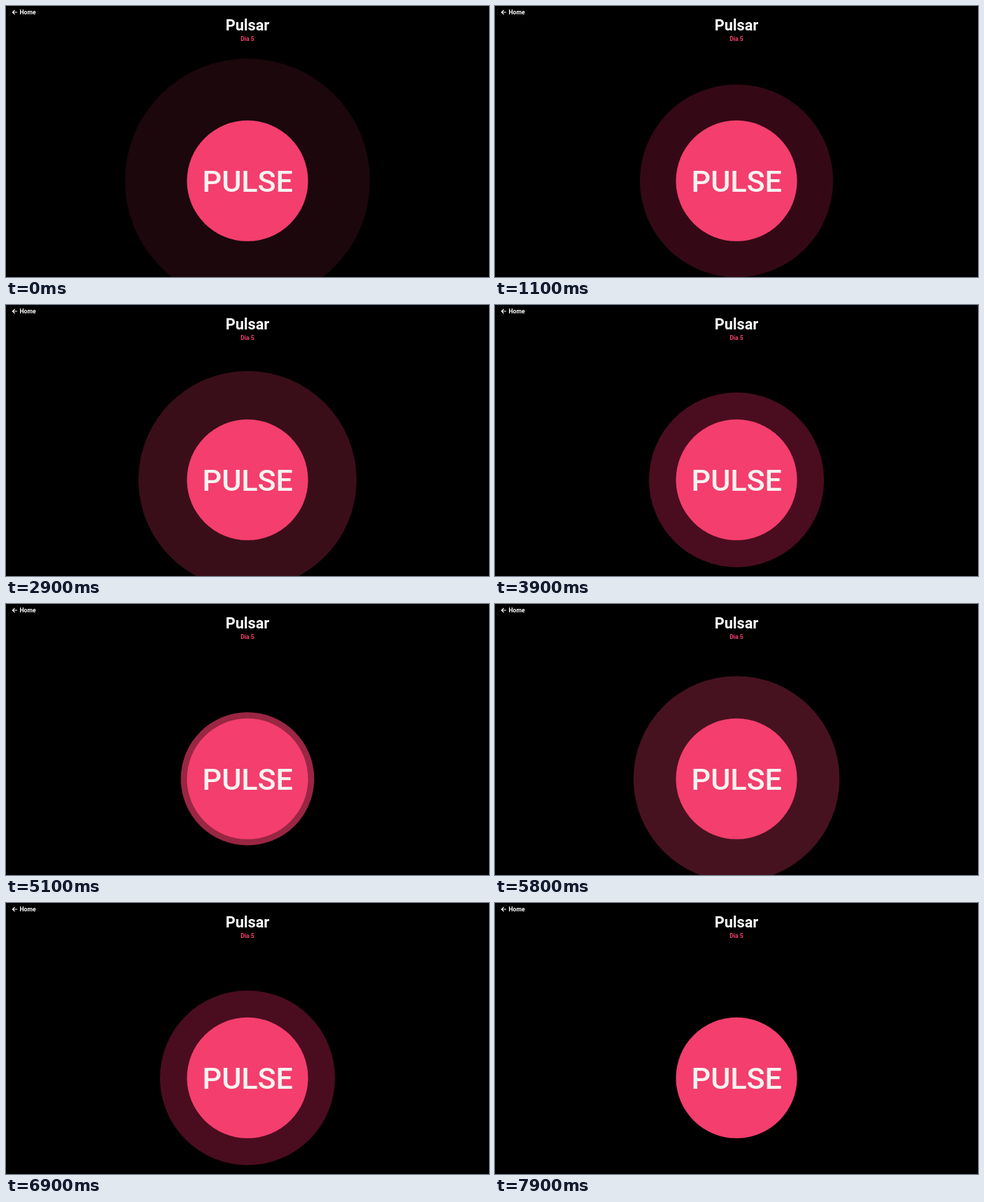
Animation of 690 by 388 pixels, one loop 8 s. Source, as an HTML page:

```html
<!DOCTYPE html>
<html lang="pt">
<head>
<meta charset="utf-8">
<title>Pulsar</title>
<style>
  html, body { margin: 0; width: 100%; height: 100%; overflow: hidden; background: #000; }
  svg { display: block; width: 100%; height: 100%; }
  text { font-family: Roboto, Arial, sans-serif; font-weight: 700; fill: #fff; }
  .mid { text-anchor: middle; }
</style>
</head>
<body>
<svg viewBox="0 0 690 388">
  <path d="M16 9H9.6M12.6 5.8L9.4 9L12.6 12.2" fill="none" stroke="#fff" stroke-width="1.2"/>
  <text x="19.5" y="12.2" font-size="8.63">Home</text>
  <text class="mid" x="345" y="35" font-size="21.6">Pulsar</text>
  <text class="mid" x="345" y="50" font-size="8.63" style="fill:#f43e6e">Dia 5</text>
  <circle id="ring" cx="345" cy="250.3"/>
  <circle cx="345" cy="250.3" r="86.5" fill="#f43e6e"/>
  <text class="mid" x="345.3" y="265.8" font-size="43.1" style="font-weight:500;fill:#f6f4f0">PULSE</text>
</svg>
<script>
const LOOP = 8000, STEP = 100, PEAK = 192;
const ring = document.getElementById('ring');

// [time, radius]: the ring grows and fades out, then shrinks and fades in
const keys = [
  [0, 175], [340, PEAK], [900, 153], [1100, 138], [1600, 86], [2100, 86],
  [2450, 117], [2700, 138.5], [3000, 164.5], [3315, PEAK],
  [3600, 157], [3900, 125], [4150, 104], [4400, 91], [4600, 86], [4850, 86],
  [5200, 99], [5450, 118.5], [5700, 138.5], [6000, 164.5], [6315, PEAK],
  [6600, 157], [6900, 125], [7150, 104], [7400, 90], [7550, 86], [LOOP, 86]
];

function draw(t) {
  const i = keys.findIndex(k => k[0] > t);
  const [t0, r0] = keys[i - 1], [t1, r1] = keys[i];
  const r = r0 + (r1 - r0) * (t - t0) / (t1 - t0);
  const growing = r1 > r0, gap = PEAK - r;
  ring.setAttribute('r', r);
  ring.setAttribute('fill', growing ? '#f43e6b' : '#f42c66');
  ring.setAttribute('fill-opacity', growing ? gap * 0.0065 : 0.3 * (gap / 67) ** 1.65);
}

const start = performance.now();
function tick() {
  const t = (performance.now() - start) % LOOP;
  draw(Math.floor(t / STEP) * STEP);
  requestAnimationFrame(tick);
}
tick();
</script>
</body>
</html>
```
